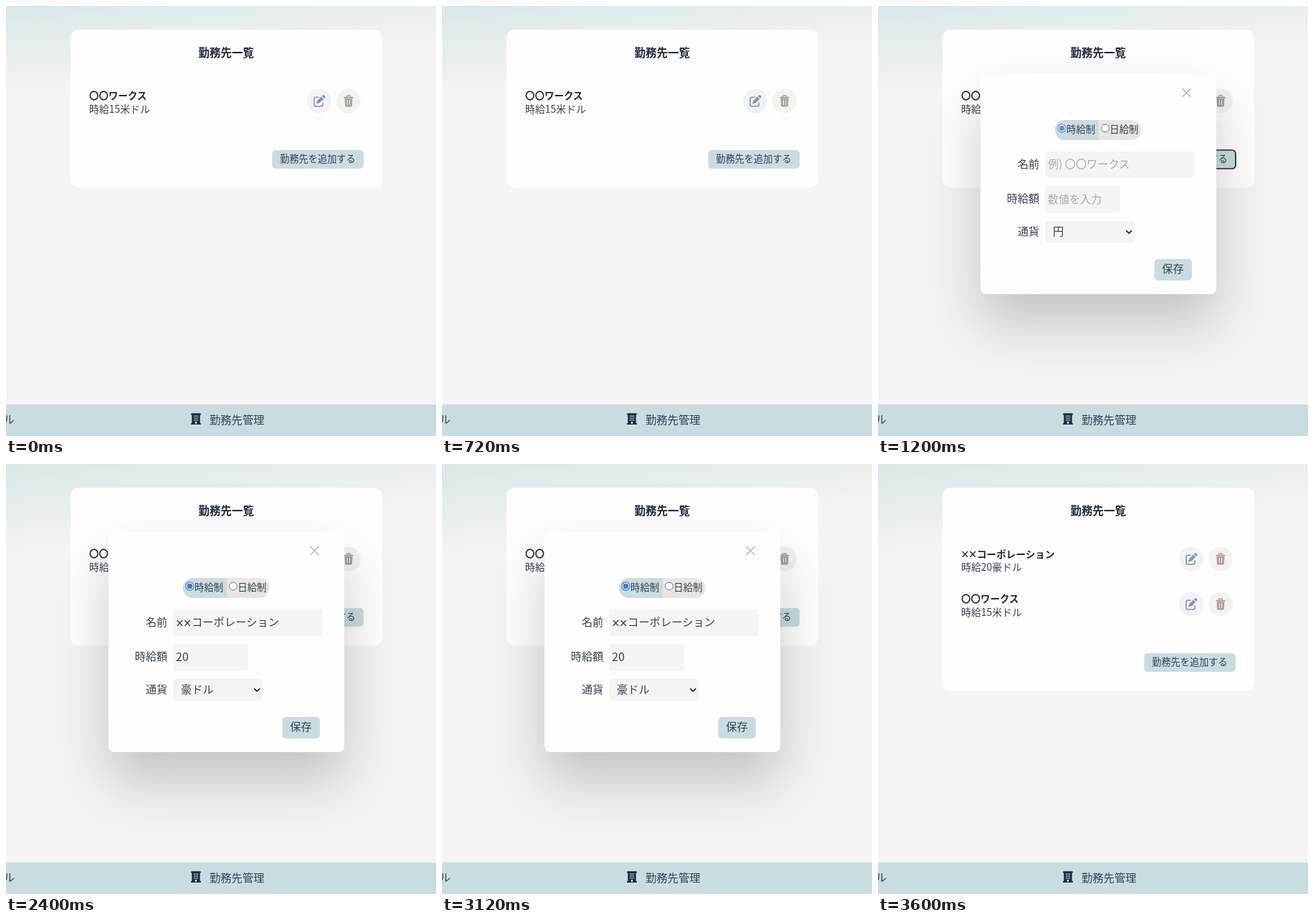
An HTML page that plays this animation: 600 by 600 pixels, repeating every 4800 ms.

```html
<!DOCTYPE html>
<html lang="ja">
<head>
<meta charset="utf-8">
<title>勤務先一覧</title>
<style>
  html, body { margin: 0; height: 100%; overflow: hidden; background: #f4f4f3; }
  svg { display: block; width: 100vw; height: 100vh; }
  text { font-family: "Noto Sans CJK JP", "Noto Sans CJK", sans-serif; font-weight: 300; fill: #364152; white-space: pre; }
  .bold { font-weight: 700; fill: #1e293b; }
  .hint { fill: #a6a8ab; }
  .end { text-anchor: end; }
  .mid { text-anchor: middle; }
  .times { font-family: "Noto Sans", sans-serif; }
  .times.bold { font-weight: 500; }
  .modal { filter: drop-shadow(0 40px 37px rgba(0, 0, 0, .2)); }
</style>
</head>
<body>
<svg id="stage" viewBox="0 0 600 600"></svg>
<script>
const STEP = 1200;
const TEAL = '#c9dde0', FIELD = '#f4f4f4', INK = '#1e293b';
const stage = document.getElementById('stage');

const box = (x, y, w, h, r, fill, extra = '') =>
  `<rect x="${x}" y="${y}" width="${w}" height="${h}" rx="${r}" fill="${fill}" ${extra}/>`;
const label = (x, y, size, str, cls = '') =>
  `<text x="${x}" y="${y}" font-size="${size}" class="${cls}">${str}</text>`;
const line = (d, color, width) =>
  `<path d="${d}" fill="none" stroke="${color}" stroke-width="${width}" stroke-linecap="round" stroke-linejoin="round"/>`;
const disc = (x, y, r, fill, extra = '') =>
  `<circle cx="${x}" cy="${y}" r="${r}" fill="${fill}" ${extra}/>`;
const at = (x, y, body) => `<g transform="translate(${x} ${y})">${body}</g>`;

// Company name with two leading crosses
const corp = (x, y, size, cls) =>
  label(x, y + 2.6, 19, '××', 'times ' + cls) +
  label(x + 22, y, size, 'コーポレーション', cls);

const editIcon = line('M7 3.2H3.5Q1 3.2 1 5.7V13.5Q1 16 3.5 16H10.7Q13.2 16 13.2 13.5V11', '#7698b1', 1.5) +
  `<path fill="#7698b1" d="M4 12.6 5.4 8.2 11 2.6 14.2 5.8 8.6 11.3ZM11.8 1.8 13 .6Q14-.2 15 .6L16.2 1.8Q17 2.8 16.2 3.8L15 5Z"/>`;

const trashIcon = color =>
  line('M4 3V2Q4 1 5 1H8Q9 1 9 2V3', color, 1.4) +
  box(0, 2.8, 13, 2, .8, color) +
  `<path fill="${color}" d="M1 5.2H12L11.4 15Q11.2 16.6 9.8 16.6H3.2Q1.8 16.6 1.6 15Z"/>` +
  line('M4.9 7.6V13.6M8.1 7.6V13.6', '#f2f2f2', 1.1);

const row = (y, name, pay, trash) => at(0, y,
  name + label(116, 149, 13.9, pay) +
  disc(437, 132.5, 17, '#f2f2f2') + disc(478, 132.5, 17, '#f2f2f2') +
  at(429, 124, editIcon) + at(471.5, 124, trashIcon(trash)));

const works = label(116, 130.3, 13.5, '〇〇ワークス', 'bold');

function building() {
  let panes = '';
  for (let i = 0; i < 9; i++) panes += box(4 + i % 3 * 2.3, 3 + (i / 3 | 0) * 2.8, 1.5, 1.5, 0, TEAL);
  return at(258, 568.5, box(0, 0, 14, 2, .5, INK) + box(1.3, 0, 11.4, 15.5, .5, INK) +
    box(0, 13.5, 14, 2, .5, INK) + panes + box(5.8, 11.5, 2.4, 3, 0, TEAL));
}

function list(step) {
  const added = step === 3, dy = added ? 63 : 0;
  const trash = added ? '#b09d95' : step ? '#999ea4' : '#a5a498';
  return box(90, 33, 435, 220.5 + dy, 12, '#fefefe') +
    label(307.3, 71, 15.5, '勤務先一覧', 'bold mid') +
    (added ? row(0, corp(116, 130.5, 13.6, 'bold'), '時給20豪ドル', trash) : '') +
    row(dy, works, '時給15米ドル', trash) +
    box(371.3, 201 + dy, 127.7, 26, 5, TEAL, step === 1 ? `stroke="${INK}" stroke-width="1.7"` : '') +
    label(435, 218 + dy, 13.2, '勤務先を追加する', 'mid');
}

function form(filled) {
  const blue = filled ? '#3f7fc9' : '#6595c3';
  return box(143, 94.5, 329, 307.5, 8, '#fefefe', 'class="modal"') +
    line('M424.7 115.2 436.3 126.8M436.3 115.2 424.7 126.8', '#a5bdc8', 1.5) +
    box(247, 159, 120.5, 28, 14, '#e8e6e4') +
    `<path fill="${TEAL}" d="M308 159H261a14 14 0 0 0 0 28H308Z"/>` +
    disc(256.5, 170.5, 5.6, '#fff', `stroke="${blue}" stroke-width="1.2"`) + disc(256.5, 170.5, 3.8, blue) +
    disc(317, 170.5, 5.4, '#fff', 'stroke="#767676" stroke-width="1"') +
    label(263, 177, 13.4, '時給制') + label(323.3, 177, 13.4, '日給制') +
    label(225.3, 225.5, 15.2, '名前', 'end') +
    label(225.3, 274, 15.2, '時給額', 'end') +
    label(225.3, 320, 15.2, '通貨', 'end') +
    box(233, 203, 209, 37, 5, FIELD) + box(233, 251, 105, 38, 5, FIELD) + box(233, 300, 125.5, 30, 5, FIELD) +
    (filled
      ? corp(237, 226, 15.3, '') + label(237, 274.5, 16, '20')
      : label(237, 226, 15.2, '例) 〇〇ワークス', 'hint') + label(237, 274.5, 15, '数値を入力', 'hint')) +
    label(244, 320, 15.2, filled ? '豪ドル' : '円') +
    line('M346.8 313.8 350.2 317.2 353.6 313.8', '#222', 1.7) +
    box(385.5, 353, 52.5, 30, 5, TEAL) + label(411.5, 372.3, 15.2, '保存', 'mid');
}

function scene(step) {
  return `<linearGradient id="sky" gradientUnits="userSpaceOnUse" x1="0" y1="0" x2="16.6" y2="128">
      <stop stop-color="#d9e7e7"/><stop offset="1" stop-color="#f4f4f3"/></linearGradient>` +
    box(0, 0, 600, 600, 0, 'url(#sky)') +
    list(step) +
    (step === 1 || step === 2 ? form(step === 2) : '') +
    box(0, 556, 600, 44, 0, TEAL) +
    label(-3.4, 583, 15.4, 'ル') + building() + label(284, 583, 15.3, '勤務先管理');
}

let shown = -1;
function tick() {
  const step = Math.floor(performance.now() / STEP) % 4;
  if (step !== shown) stage.innerHTML = scene(shown = step);
  requestAnimationFrame(tick);
}
tick();
</script>
</body>
</html>
```
